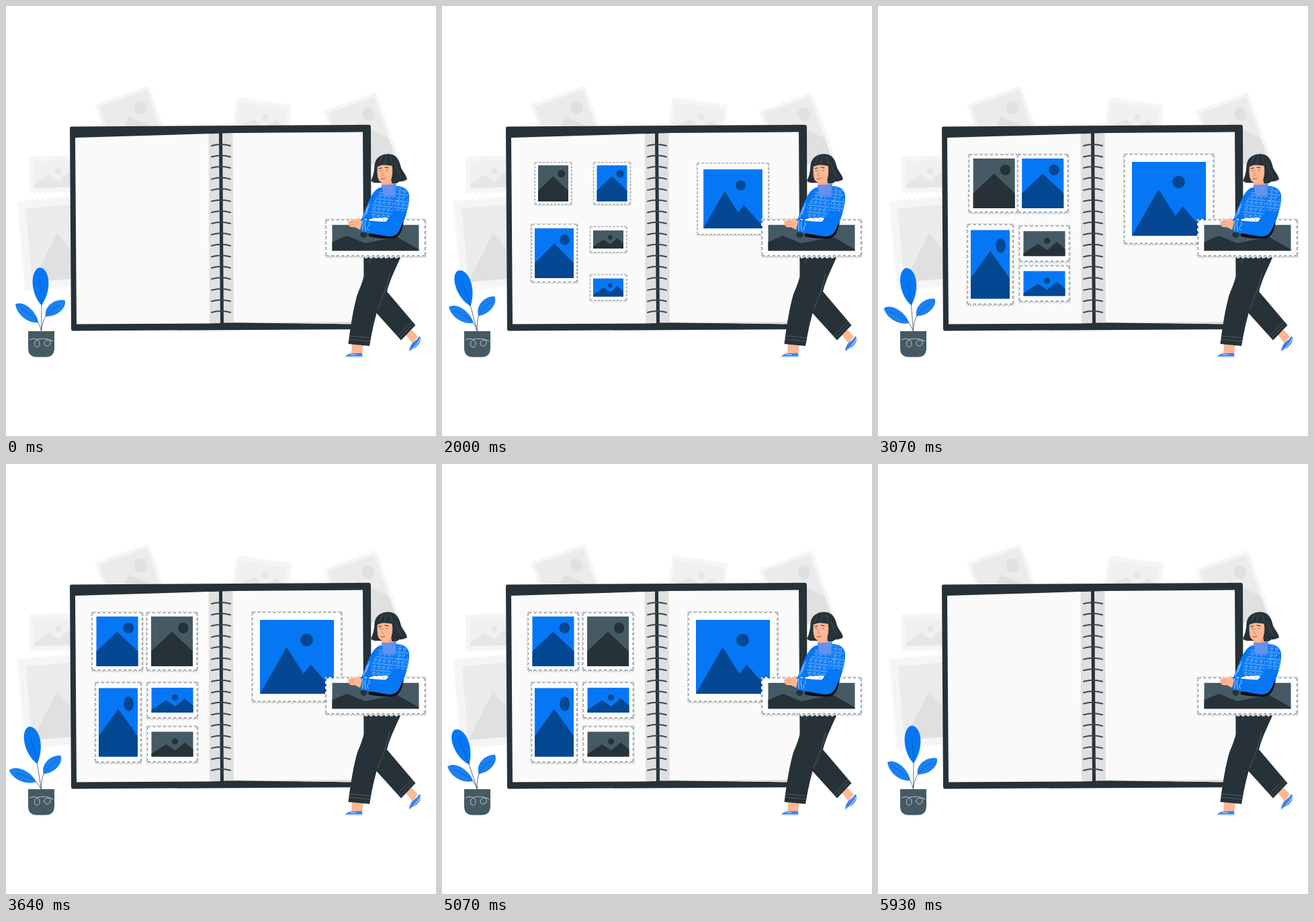
Animation of 640 by 640 pixels, one loop 6000 ms. Source, as an HTML page:

```html
<!DOCTYPE html>
<html lang="en">
<head>
<meta charset="utf-8">
<title>Stamp album</title>
<style>
html, body { margin: 0; width: 100%; height: 100%; overflow: hidden; background: #fff; }
svg { display: block; width: 100vw; height: 100vh; }
.line { fill: none; }
.stem { fill: none; stroke: #455a64; stroke-width: .8; }
.vein { fill: none; stroke: #0b57b0; stroke-width: .7; }
.blue { fill: #0677f4; }
.leaf { fill: #1b80f2; }
.ink { fill: #263238; }
.skin { fill: #ffb893; }
.shoe { fill: #3c82ef; }
</style>
</head>
<body>
<svg viewBox="0 0 640 640" stroke-linejoin="round" stroke-linecap="round">
  <defs>
    <pattern id="knit" width="7" height="10" patternUnits="userSpaceOnUse" patternTransform="rotate(6)">
      <path d="M5 2.500A2 2 0 1 0 4 4.500M0 8.500L1.800 6.800L3.500 8.500L5.200 6.800L7 8.500" class="line" stroke="#c9e1ff" stroke-width=".8"/>
    </pattern>
  </defs>

  <g id="back"></g>

  <g id="book">
    <path d="M97 179.500L540 176.800Q543 177 543 180L544 479Q544 481 541 481L100 483.500Q97 483.500 97 481L95 182Q95 179.500 97 179.500Z" class="ink"/>
    <path d="M103 196L302 190L303.500 472.500L105 473.500Z" fill="#fafafa"/>
    <path d="M301.500 190.200L317 189.800L319 472L303 472.500ZM322 189.500L338 189L339.500 471.500L324 471.500Z" fill="#e0e0e0"/>
    <path d="M337.500 189L531 187.500L533 473.500L339 471.200Z" fill="#fafafa"/>
    <path d="M370 470.800L533 470L533 473.800Z" fill="#e0e0e0"/>
    <g id="rings" class="line" stroke="#37474f" stroke-width="2"></g>
  </g>

  <g id="album"></g>

  <g id="plant">
    <g id="leafL">
      <path d="M48 471Q51 477 52.500 484" class="stem"/>
      <path d="M48 471C37 473 17 463 14 444C26 437 46 455 48 471Z" class="leaf"/>
      <path d="M22 450Q37 458 48 471" class="vein"/>
    </g>
    <g id="leafR">
      <path d="M59 462Q54 470 52.500 484" class="stem"/>
      <path d="M59 462C56 448 72 435 87.500 438C91 447 78 463 59 462Z" class="leaf"/>
      <path d="M79 446Q68 450 59 462" class="vein"/>
    </g>
    <g id="leafT">
      <path d="M53 445L52.500 484" class="stem"/>
      <path d="M53 445.500C37 430 35 395 49 389.500C63 388 71 418 53 445.500Z" class="blue"/>
      <path d="M50 406Q53 425 53 445" class="vein"/>
    </g>
    <path d="M33 484H72V509Q72 522.500 59 522.500H46Q33 522.500 33 509Z" fill="#455a64"/>
    <path d="M35 497C40 494 46 495 49 499C52 504 48 510 44 507C40 503 44 496 50 495.500C57 495 67 494 66 502C65 508 57 507 57 502C57 497 65 495 70 499" class="line" stroke="#dfe4e6" stroke-width=".8"/>
  </g>

  <g id="woman">
    <path d="M594 488L604 482L613 492L605 502Z" class="skin"/>
    <path d="M600 513Q602 503 607 500Q612 497 615 491.500L617.500 494Q617 502 610 508Q605 510 602 514Z" class="shoe"/>
    <path d="M601 513.500Q609 509 617 495" class="line" stroke="#fff"/>
    <path d="M515 502L532 503L530 518L514 518Z" class="skin"/>
    <path d="M505 521.500Q508 518 514 517L530 516.500L530.500 522.500H505Z" class="shoe"/>
    <path d="M505 521.800H530M513 518.500L520 519" class="line" stroke="#fff" stroke-width=".8"/>
    <path d="M550 370H589C581 389 572 405 567 425L609.500 475L588 497.500L545 450Z" class="ink"/>
    <path d="M533 368H574C572 400 563 425 555 446Q547 470 541 506L509.500 503C513 475 517 450 523 429Q530 413 533 401Z" class="ink"/>
    <path d="M512 491L543 494M511.500 496L542 499M583 491L604 469M586 494L607 472M543 375L541 382M571 398Q567 421 553 452" class="line" stroke="#5d6b72" stroke-width=".7"/>
    <path d="M548.500 237C550 224 561 219.500 571 220.500C581 221 585 229 587 237C589 246 595 249 597 258Q592 262 586 261Q580 266 573 264L553 263Q547 264 543 260Q548 251 548.500 237Z" class="ink"/>
    <path d="M560 257H573L576 272H559Z" fill="#ffa889"/>
    <path d="M553 236L574 233Q577 248 573 259Q565 267 558 262C552 259 552 247 553 236Z" class="skin"/>
    <path d="M550 241Q550 226 565 223Q578 224 579 240Q574 237 568 237Q558 235 550 241Z" class="ink"/>
    <path d="M555 242L559 241M564 240L569 241M557 245V245.500M567 244.500V245" class="line" stroke="#263238" stroke-width="1.200"/>
    <path d="M561 244Q559 250 559.500 252H562" class="line" stroke="#c56f5d" stroke-width=".7"/>
    <path d="M558 257Q561 258 564 256" class="line" stroke="#c83e45" stroke-width="1.100"/>
    <path d="M560 224L555 235M566 223L564 234M572 224L575 235M579 234Q582 246 588 255" class="line" stroke="#607078" stroke-width=".5"/>
    <path d="M558 270C545 272 538 295 529 318L539 344H570L584 340C594 318 601 297 600 281Q597 269 583 268Z" class="blue"/>
    <path d="M556 275L577 283L576 312L564 318H544L543 300Z" fill="url(#knit)"/>
    <path d="M582 270Q598 270 599 283L597 304L577 302Z" fill="url(#knit)"/>
    <path d="M559 266Q570 267 581 264.500L580 284H561Z" fill="#568cee"/>
    <path d="M562 274H580" class="line" stroke="#8db2f5" stroke-width="14" stroke-linecap="butt" stroke-dasharray=".6 2.400"/>
    <path d="M538 299L532 315M541 294L536 310" class="line" stroke="#c9e1ff" stroke-width=".8"/>

    <g id="held"></g>
    <path d="M544 319Q549 315 553 318Q557 315 560 318Q563 315 567 317" class="line" stroke="#fff" stroke-width="3"/>
    <path d="M540 339Q560 335 574 317L592 320Q589 344 576 346Q560 347 540 343Z" fill="#0a0d10"/>
    <path d="M600 281C600 300 593 319 585 335Q580 344 569 343L528 336L527 317Q546 321 565 321Q575 315 576 298Z" class="blue"/>
    <path d="M579 290L599 287L597 306L577 304Z" fill="url(#knit)"/>
    <path d="M530 321Q526 317 523 311Q526 316 523.500 317L512 319Q508 321 510 323Q507 325 511 327Q512 330 519 329L527 333Z" class="skin"/>
    <path d="M510 322L520 321.500M511 326L520 325" class="line" stroke="#d7826f" stroke-width=".6"/>
    <path d="M531 319V334M535 321Q533 327 536 335M540 322Q543 325 539 328Q536 331 540 334" class="line" stroke="#c9e1ff" stroke-width=".9" stroke-dasharray="3 1"/>
  </g>
</svg>
<script>
const $ = id => document.getElementById(id);
const BLUE = ['#fcfcfc', '#0677f4', '#044792'];
const SLATE = ['#fcfcfc', '#455a64', '#263238'];
const GREY = ['#f5f5f5', '#ebebeb', '#e0e0e0'];
const MIST = ['#f5f5f5', '#f0f0f0', '#e6e6e6'];

// Landscapes in fractions of the picture: sun as x, y, rx, ry, then the ridge
const PEAK = { sun: [.77, .23, .125, .108], ridge: [[0, .7], [.5, .305], [1, .7]] };
const TWIN = { sun: [.565, .39, .073, .122], ridge: [[0, .89], [.35, .51], [.57, .76], [.8, .43], [1, .71]] };
const ALPS = { sun: [.632, .273, .085, .085], ridge: [[0, 1], [.36, .37], [.59, .73], [.686, .605], [1, .96]] };
const DUNES = { sun: [.364, .37, .039, .132], ridge: [[0, .66], [.17, .42], [.38, .71], [.75, .47], [1, .95]] };

// Outline with a half-round notch in the middle of every step
function perf(w, h, pitch = 7.500) {
  let d = 'M0 0';
  for (const [len, dx, dy] of [[w, 1, 0], [h, 0, 1], [w, -1, 0], [h, 0, -1]]) {
    const n = Math.round(len / pitch), r = len / n / 4;
    const flat = `l${dx * r} ${dy * r}`;
    d += (flat + `a${r} ${r} 0 0 0 ${dx * r * 2} ${dy * r * 2}` + flat).repeat(n);
  }
  return d;
}

function stamp(w, h, [mx, my], { sun, ridge }, [paper, sky, land], pale) {
  const edge = perf(w, h), iw = w - 2 * mx, ih = h - 2 * my;
  const px = x => mx + x * iw, py = y => my + y * ih;
  const [x, y, rx, ry] = sun;
  const hills = [[0, 1], ...ridge, [1, 1]].map(([a, b]) => `${px(a)},${py(b)}`).join(' ');
  const shadow = pale ? '' : `<path d="${edge}" fill="#e3e3e3" transform="translate(1 2.500)"/>`;
  // Turning lines into moves leaves only the notches to be inked
  const ink = pale ? '' : `<path d="${edge.replaceAll('l', 'm')}" fill="none" stroke="#37444b" stroke-width=".7"/>`;
  return `${shadow}<path d="${edge}" fill="${paper}"/>${ink}
    <rect x="${mx}" y="${my}" width="${iw}" height="${ih}" fill="${sky}"/>
    <ellipse cx="${px(x)}" cy="${py(y)}" rx="${rx * iw}" ry="${ry * ih}" fill="${land}"/>
    <polygon points="${hills}" fill="${land}"/>`;
}

const place = (x, y, turn, art) => `<g transform="translate(${x} ${y}) rotate(${turn})">${art}</g>`;
$('back').innerHTML =
  place(131, 146, -19.200, stamp(87, 105, [6, 6], PEAK, GREY, true)) +
  place(343, 135, 8, stamp(84, 58, [6, 8], TWIN, MIST, true)) +
  place(471, 156, -19.800, stamp(85, 106, [6, 6], PEAK, GREY, true)) +
  place(34, 223, -1, stamp(78, 56, [7, 8], TWIN, MIST, true)) +
  place(16, 290, -5, stamp(145, 135, [12.500, 12.500], ALPS, GREY, true));
$('held').innerHTML = place(475, 317, 0, stamp(150, 56, [10.500, 8.800], DUNES, SLATE));

$('rings').innerHTML = Array.from({ length: 16 }, (_, i) =>
  `<path d="M306 ${208 + i * 16.530}q14 -4 28 0"/>`).join('');

const tallCard = [77, 88, [7.500, 7], PEAK], wideCard = [77, 55, [7.500, 9], TWIN];
const album = [
  { art: [...tallCard, SLATE], from: [165.500, 264], to: [247, 264] },
  { art: [...tallCard, BLUE], from: [253, 264], to: [165.500, 264] },
  { art: [...wideCard, SLATE], from: [247.500, 347.500], to: [247.500, 417] },
  { art: [...wideCard, BLUE], from: [247.500, 419], to: [247.500, 351.500] },
  { art: [70, 121, [6, 9.500], PEAK, BLUE], from: [167, 324], unroll: true },
  { art: [135, 135, [12.500, 12.500], ALPS, BLUE], from: [433, 287], bounce: true }
];
$('album').innerHTML = album.map(a => `<g>${stamp(...a.art)}</g>`).join('');

const span = (t, a, b) => Math.min(1, Math.max(0, (t - a) / (b - a)));
const ease = p => (1 - Math.cos(Math.PI * p)) / 2;
const mix = (a, b, p) => a + (b - a) * p;

// Each leaf leans out, comes part way back, leans again and returns
const sway = {
  leafT: [[1750, -17], [3000, -5], [4800, -22]],
  leafL: [[900, -13.500], [2450, -4], [4150, -19]],
  leafR: [[1500, -16], [2700, -3], [4700, -13]]
};
function lean(t, turns) {
  let t0 = 0, v0 = 0;
  for (const [t1, v1] of [...turns, [5930, 0]]) {
    if (t < t1) return mix(v0, v1, ease(span(t, t0, t1)));
    [t0, v0] = [t1, v1];
  }
  return 0;
}

function draw(t) {
  for (const id in sway)
    $(id).setAttribute('transform', `rotate(${lean(t, sway[id])} 52.500 484)`);

  const grow = 1 - (1 - span(t, 1260, 2410)) ** 1.250;
  const size = grow * (1 - span(t, 5400, 5920) ** 1.400);
  const swap = ease(span(t, 2950, 3580));
  album.forEach(({ art: [w, h], from, to = from, unroll, bounce }, i) => {
    const el = $('album').children[i];
    const s = bounce ? size * mix(1.100, 1, span(t, 2430, 2655)) : size;
    const x = mix(from[0], to[0], swap), y = mix(from[1], to[1], swap);
    el.setAttribute('transform',
      `translate(${x} ${y}) scale(${unroll ? 1 : s} ${s}) translate(${-w / 2} ${unroll ? 0 : -h / 2})`);
    el.setAttribute('visibility', size > 0 ? 'visible' : 'hidden');
  });
}

const start = performance.now();
function tick() {
  draw((performance.now() - start) % 6000);
  requestAnimationFrame(tick);
}
tick();
</script>
</body>
</html>
```
